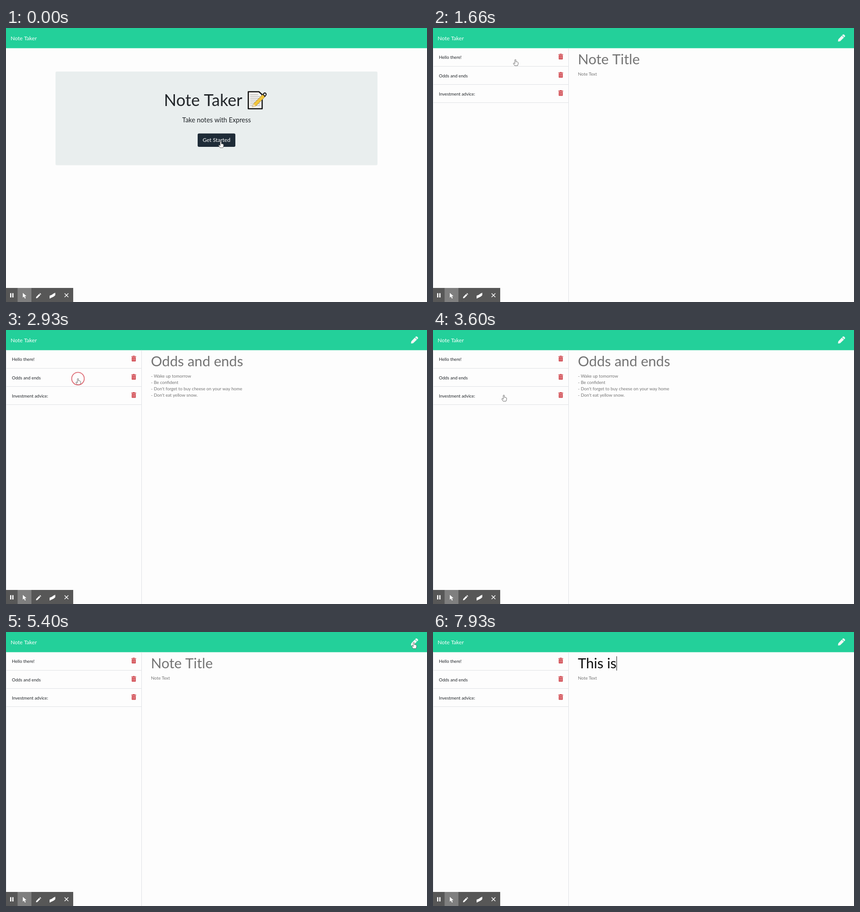
Write an HTML page with a canvas that moves like this. It is 927 px wide and 604 px high and loops after 8000 ms.

```html
<!DOCTYPE html>
<html lang="en">
<head>
<meta charset="utf-8">
<title>Note Taker</title>
<style>
  html, body { margin: 0; width: 100%; height: 100%; overflow: hidden; background: #fdfdfd; }
  canvas { display: block; width: 927px; height: 604px; }
</style>
</head>
<body>
<canvas id="stage"></canvas>
<script>
const W = 927, H = 604, LOOP = 8000;
const canvas = document.getElementById('stage');
const ctx = canvas.getContext('2d');
const dpr = window.devicePixelRatio || 1;
canvas.width = W * dpr;
canvas.height = H * dpr;

const GREEN = '#23d09a', GRAY = '#747474', RULE = '#dfe1e4', INK = '#212529';
const ROWS = ['Hello there!', 'Odds and ends', 'Investment advice:'];
const BODIES = [
  ['Welcome to my notes.'],
  ['- Wake up tomorrow', '- Be confident', "- Don't forget to buy cheese on your way home", "- Don't eat yellow snow."],
  ['Keep an eye on glimmertape.']
];
const EMPTY = { title: 'Note Title', body: ['Note Text'] };

const NOTES_PAGE = 330, LIST_LOADED = 530, FOCUS = 6260;
// Start time and selected row; -1 is a blank note.
const SELECTED = [[0, -1], [1870, 0], [2870, 1], [4120, 2], [5180, -1]];
const KEYS = [7260, 7330, 7460, 7530, 7660, 7800, 7930];
const TYPED = 'This is';
const CLICKS = [60, 1800, 2820, 4060, 5080, 6250];
const RING_MS = 220;
// Moves: start, end, from x, from y, to x, to y.
const MOVES = [
  [0, 0, 473, 250, 473, 250],
  [1200, 1530, 290, 150, 181.5, 69],
  [2200, 2640, 181.5, 69, 158.5, 106.5],
  [3060, 3600, 158.5, 106.5, 156, 143],
  [4800, 5050, 170, 130, 898, 22.5],
  [5430, 5730, 898, 22.5, 420, 69]
];
const HIDDEN = [[530, 1200], [4430, 4800], [6430, LOOP]];

const ease = p => p * p * (3 - 2 * p);
const lastBefore = (list, t) => list.filter(item => item[0] <= t).pop();

function text(str, x, y, size, color, align = 'left') {
  ctx.font = `${size}px Lato, sans-serif`;
  ctx.textAlign = align;
  ctx.fillStyle = color;
  ctx.fillText(str, x, y);
}

function box(x, y, w, h, color, r = 0) {
  ctx.fillStyle = color;
  ctx.beginPath();
  ctx.roundRect(x, y, w, h, r);
  ctx.fill();
}

function line(x1, y1, x2, y2, color, width = 1) {
  ctx.strokeStyle = color;
  ctx.lineWidth = width;
  ctx.beginPath();
  ctx.moveTo(x1, y1);
  ctx.lineTo(x2, y2);
  ctx.stroke();
}

function shape(d, x, y, fill, stroke, width = 1) {
  const path = new Path2D(d);
  ctx.save();
  ctx.translate(x, y);
  ctx.lineJoin = 'round';
  if (fill) { ctx.fillStyle = fill; ctx.fill(path); }
  if (stroke) { ctx.strokeStyle = stroke; ctx.lineWidth = width; ctx.stroke(path); }
  ctx.restore();
}

function header() {
  box(0, 0, W, 44.5, GREEN);
  text('Note Taker', 10.3, 26.6, 12, '#fff');
}

function memo() {
  shape('M1.5 1.5H25L32 8V39H1.5Z', 532, 139, '#f6f5f1', '#111', 2.6);
  for (let i = 0; i < 7; i++) {
    const y = 147 + i * 4;
    line(537.5, y, i ? 560 : 555, y, '#aaa', 1.1);
  }
  shape('M0 0L3-7 24-28 29-23 8-2Z', 542, 174, '#f3c63c', '#8a712c', .8);
  shape('M0 0L3-7 8-2Z', 542, 174, '#f3dfb5');
  shape('M24-28L27-31Q31-31 31-27L28-23Z', 542, 174, '#d9d9d9', '#111', 1.8);
}

function homePage() {
  box(109, 96, 709, 206.5, '#e9eeee', 3);
  text('Note Taker', 347.8, 172, 36, INK);
  memo();
  text('Take notes with Express', 463.6, 208.3, 14.4, INK, 'center');
  box(422, 232.5, 83, 29.5, '#1e2b37', 3);
  text('Get Started', 463.5, 251.3, 12.1, '#fff', 'center');
}

function trash(y) {
  const red = '#d0454c';
  box(276, y - 5.3, 10.6, 1.6, red, .5);
  box(279, y - 6.3, 4.6, 1.6, red, .5);
  box(276.8, y - 3, 9, 9.2, red, 1);
  for (let i = 0; i < 3; i++) box(278.6 + i * 2.4, y - 1.5, .7, 6, '#f3cfd1');
}

function list() {
  ROWS.forEach((name, i) => {
    const y = 63 + i * 40.2;
    text(name, 13, y + 5.4, 9.7, INK);
    trash(y);
    line(1, Math.round(y + 21) + .5, 298, Math.round(y + 21) + .5, RULE);
  });
}

function editor(t) {
  const row = lastBefore(SELECTED, t)[1];
  const note = row < 0 ? EMPTY : { title: ROWS[row], body: BODIES[row] };
  const typed = TYPED.slice(0, KEYS.filter(k => k <= t).length);
  text(typed || note.title, 319, 80.3, 31, typed ? '#0c0c0c' : GRAY);
  const caretX = 319.5 + (typed ? ctx.measureText(typed).width : 0);
  note.body.forEach((s, i) => text(s, 319.3, 105.3 + i * 14.05, 9.7, GRAY));
  if (t >= FOCUS && (t < 6800 || t >= KEYS[0])) line(caretX, 53.5, caretX, 85, '#111');
}

function notesPage(t) {
  line(.5, 44.5, .5, H, RULE);
  line(298.5, 44.5, 298.5, H, RULE);
  shape('M10.7.7Q12 -.4 13.4.7L15.3 2.6Q16.4 4 15.3 5.3L13.8 6.8 9.2 2.2ZM8.5 2.9L13.1 7.5 4.7 15.4 .6 16Q-.1 16 0 15.3L.7 11.2Z', 891.7, 13.8, '#f1f7f5');
  if (t >= LIST_LOADED) list();
  editor(t);
}

function toolbar() {
  box(0, 573, 148, 31, '#575757');
  box(25.5, 573, 30.5, 31, '#7f7f7f');
  box(9, 584.5, 2.7, 9.5, '#fff');
  box(13.8, 584.5, 2.7, 9.5, '#fff');
  shape('M0 0V10.2L2.6 8 4.7 12.4 6.4 11.6 4.4 7.3 8 7Z', 37, 584, '#fff');
  shape('M0 11.5L.6 8.4 7 2 9.5 4.5 3.1 10.9ZM7.8 1.2L9 0 11.5 2.5 10.3 3.7Z', 66, 584.3, '#fff');
  shape('M0 6.5Q5 5.5 8 2.2L12.5 0V5.5Q9 9.7 5.2 10.5L0 13Z', 96, 583.5, '#fff');
  line(129, 585, 137.3, 593.3, '#fff', 1.5);
  line(137.3, 585, 129, 593.3, '#fff', 1.5);
}

function pointerAt(t) {
  const [start, end, x1, y1, x2, y2] = lastBefore(MOVES, t);
  const p = end > start ? ease(Math.min(1, (t - start) / (end - start))) : 1;
  return [x1 + (x2 - x1) * p, y1 + (y2 - y1) * p];
}

function pointer(t, x, y) {
  if (HIDDEN.some(([from, to]) => t >= from && t < to)) return;
  const onLink = t < LIST_LOADED || x < 298 || (x > 888 && y < 32);
  if (onLink) {
    shape('M-1.3 1.2Q0-.7 1.2 1.2V5.6L3 5.3 4.8 6 6 7V10.3L4.7 14H-1.5L-4.6 9.4Q-4.3 7.4-2.7 8.4L-1.3 9.8Z', x, y, '#fff', '#666');
  } else if (x > 310 && y > 45) {
    shape('M-2.5-6H-.5L0-5.5 .5-6H2.5M0-5.5V5.5M-2.5 6H-.5L0 5.5 .5 6H2.5', x, y, null, '#333');
  } else {
    shape('M0 0V11L2.6 8.8 4.3 12.8 6 12 4.3 8.2 7.8 8Z', x, y, '#fff', '#444', .9);
  }
}

function ring(t, x, y) {
  const start = CLICKS.find(c => t >= c && t < c + RING_MS);
  if (start === undefined) return;
  const p = (t - start) / RING_MS;
  ctx.globalAlpha = Math.min(1, (1 - p) * 1.7);
  ctx.strokeStyle = '#d8525d';
  ctx.lineWidth = 1.9;
  ctx.beginPath();
  ctx.arc(x, y + .7, 6 + 15.5 * p, 0, Math.PI * 2);
  ctx.stroke();
  ctx.globalAlpha = 1;
}

function draw(t) {
  ctx.setTransform(dpr, 0, 0, dpr, 0, 0);
  box(0, 0, W, H, '#fdfdfd');
  header();
  if (t < NOTES_PAGE) homePage();
  else notesPage(t);
  toolbar();
  const [x, y] = pointerAt(t);
  pointer(t, x, y);
  ring(t, x, y);
}

const begin = performance.now();
function tick() {
  draw((performance.now() - begin) % LOOP);
  requestAnimationFrame(tick);
}
tick();
</script>
</body>
</html>
```
